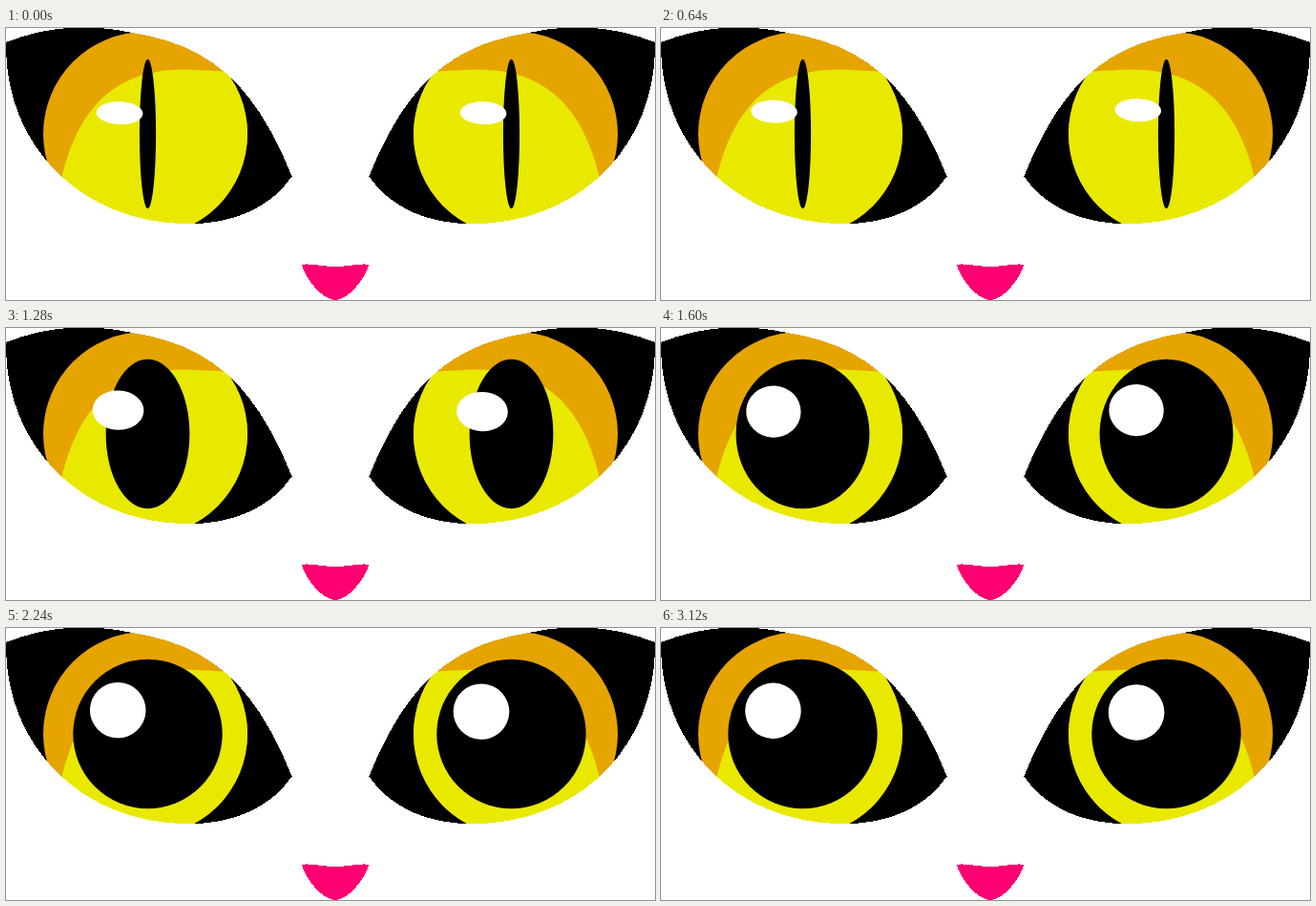
These frames come from a looping animation (680 by 285 pixels, 3200 ms). An HTML page:

```html
<!DOCTYPE html>
<html lang="en">
<head>
<meta charset="utf-8">
<title>Cat eyes</title>
<style>
html, body { margin: 0; width: 100%; height: 100%; overflow: hidden; background: #fff; }
svg { display: block; width: 680px; height: 285px; }
.crisp { shape-rendering: crispEdges; }
</style>
</head>
<body>
<svg viewBox="0 0 680 285">
  <defs>
    <clipPath id="inIris"><circle cx="146" cy="111" r="107"/></clipPath>
    <!-- black socket, two-tone iris, then a white cover with an eye-shaped hole -->
    <g id="eye">
      <rect width="320" height="225"/>
      <g clip-path="url(#inIris)">
        <rect x="30" width="230" height="225" fill="#e6a400"/>
        <path d="M57 162C72 95 105 42 190 43.5L228 45.5L260 49V225H57Z" fill="#e9e900"/>
      </g>
      <path class="crisp" fill="#fff" fill-rule="evenodd" d="M-5 -5H325V230H-5Z
        M0 15C45 -3 90 -4 130 4.5C211 17 259 55 299.7 155.5C276 190 235 206 188 205.2C75 203 -2 120 0 15Z"/>
    </g>
  </defs>
  <use href="#eye"/>
  <use href="#eye" transform="translate(680 0) scale(-1 1)"/>
  <path class="crisp" d="M310.5 248C318 246 330 250 345 250C360 250 372 246 379.5 248C382 252 362 285 345 285C328 285 308 252 310.5 248Z" fill="#ff0073"/>
  <g id="moving"></g>
</svg>
<script>
const LOOP = 3200, STEP = 80, WOBBLE = 12;
const layer = document.getElementById('moving');

function set(el, attrs) {
  for (const k in attrs) el.setAttribute(k, attrs[k]);
}
function ellipse(attrs) {
  const el = document.createElementNS('http://www.w3.org/2000/svg', 'ellipse');
  layer.appendChild(el);
  set(el, attrs);
  return el;
}
// drift: sideways glint travel while the pupil widens; peak: step of the lowest glint position
function makeEye(x, glintX, drift, peak, sway) {
  return {
    glintX, drift, peak, sway,
    pupil: ellipse({ cx: x, cy: 111, ry: 78.2 }),
    glint: ellipse({ fill: '#fff' })
  };
}
const eyes = [
  makeEye(148.5, 118.5, -0.7, 11, 0.7),
  makeEye(529.5, 500, -2, 1, 0.2)
];

function smooth(u) {
  u = Math.min(1, Math.max(0, u));
  return u * u * (3 - 2 * u);
}

function draw(time) {
  const step = Math.floor((time % LOOP) / STEP);
  const grow = smooth((step * STEP - 705) / 1140);
  // the glint rests for one step twice per wobble
  const held = step % 6 === 1 ? step - 1 : step;
  for (const eye of eyes) {
    const wave = Math.cos((held - eye.peak) / WOBBLE * 2 * Math.PI);
    const x = eye.glintX + eye.drift * grow + eye.sway * wave;
    const y = 87.6 + 1.7 * wave;
    set(eye.pupil, { rx: 8.6 + 69.6 * grow });
    set(eye.glint, {
      rx: 24.3 + 5 * grow, ry: 12 + 17.2 * grow,
      transform: `translate(${x} ${y}) rotate(2)`
    });
  }
}

const start = performance.now();
function tick() {
  draw(performance.now() - start);
  requestAnimationFrame(tick);
}
draw(0);
requestAnimationFrame(tick);
</script>
</body>
</html>
```
